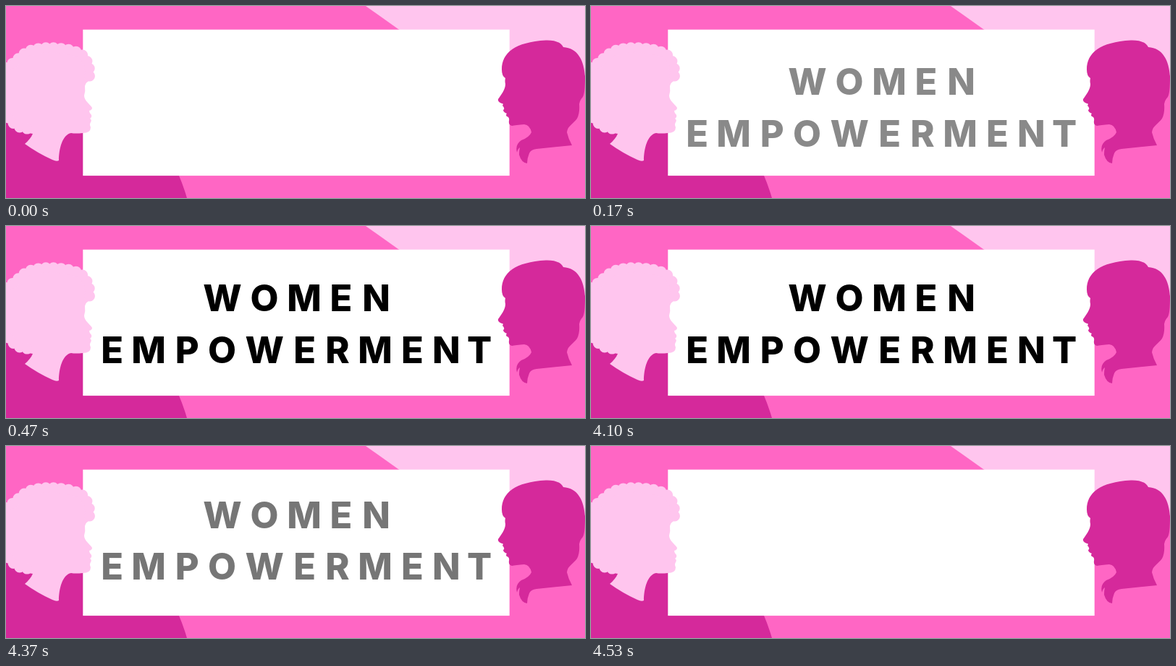
These frames come from a looping animation (800 by 266 pixels, 5.01 s). An HTML page:

```html
<!DOCTYPE html>
<html lang="en">
<head>
<meta charset="utf-8">
<title>Women Empowerment</title>
<style>
  html, body { margin: 0; height: 100%; overflow: hidden; background: #ff66c4; }
  svg { display: block; width: 100%; height: 100%; }
  text { font: 800 50.5px Inter, "Open Sans", sans-serif; text-anchor: middle; }
  .light { fill: #ffc5ee; }
  .dark { fill: #d5299b; }
  .curls { fill: none; stroke: #ffc5ee; stroke-width: 15; stroke-linecap: round; stroke-dasharray: 0 10.5; }
</style>
</head>
<body>
<svg viewBox="0 0 800 266">
  <!-- backdrop -->
  <path class="light" d="M497 0L542 32Q640 92 800 96V0Z"/>
  <path class="dark" d="M0 146Q200 140 239 235Q245 249 250 266H0Z"/>
  <rect x="106.300" y="32.700" width="589.400" height="202.400" fill="#fff"/>

  <!-- left profile -->
  <path class="light" d="M0 84C10 80 20 66 34 60C60 53 90 56 104 66C112 72 117 85 117 103
    Q110 105 109 111Q110 118 108 124C108 131 116 136 119 141Q119 144 115 145Q115 148 118 151
    Q119 154 116 156Q119 158 117 161Q115 164 117 168Q117 176 106 176Q96 177 90 176
    C78 178 73 198 73 214Q70 216 64 213Q44 204 26 191Q34 184 37 177Q12 174 0 149Z"/>
  <path class="curls" d="M115.500 97C117 85 112 72 103 66C85 56 40 54 25 66C15 74 6 83 -4 88"/>
  <path class="curls" d="M-3 146C7 162 17 171 31 170"/>

  <!-- right profile -->
  <path class="dark" d="M690 100Q685 97 685 88C685 65 703 50 746 47.500Q765 47 770 57
    C790 58 799 76 800 98Q800 121 797 126Q793 130 792 136Q793 148 789 156C783 164 776 166 775 175
    Q777 184 782 193L733 198Q725 199 723 204Q720 211 720 218Q712 217 709 206Q709 200 710 196
    Q707 198 706 203Q703 192 712 186Q723 182 726 175Q724 165 716 164Q704 165 699 166
    Q694 165 695 159Q696 154 692 153Q690 151 692 149Q687 147 687 144Q690 142 686 138
    Q688 135 685 135Q679 133 680 129C684 123 690 116 690 108Q689 104 690 100Z"/>

  <g id="title">
    <text y="118.300" x="299 357 412 463 511.500">WOMEN</text>
    <text y="189.700" x="146.700 197 250.200 298.500 357.300 412.700 458 510 561.500 608.300 654">EMPOWERMENT</text>
  </g>
</svg>
<script>
  const LOOP = 5010, FRAME = 100 / 3, FADE = 430, RISE = 9, POWER = 1.6;
  const title = document.getElementById("title");
  const progress = (t, start) => Math.min(1, Math.max(0, (t - start) / FADE));

  function draw(now) {
    // the motion advances at 30 steps per second
    const t = Math.floor((now % LOOP + 4) / FRAME) * FRAME;
    const before = t < 60 ? 1 : (1 - progress(t, 30)) ** POWER;
    const after = progress(t, 4100) ** POWER;
    title.setAttribute("opacity", 1 - before - after);
    title.setAttribute("transform", `translate(0 ${RISE * (before - after)})`);
    requestAnimationFrame(draw);
  }
  draw(performance.now());
</script>
</body>
</html>
```
